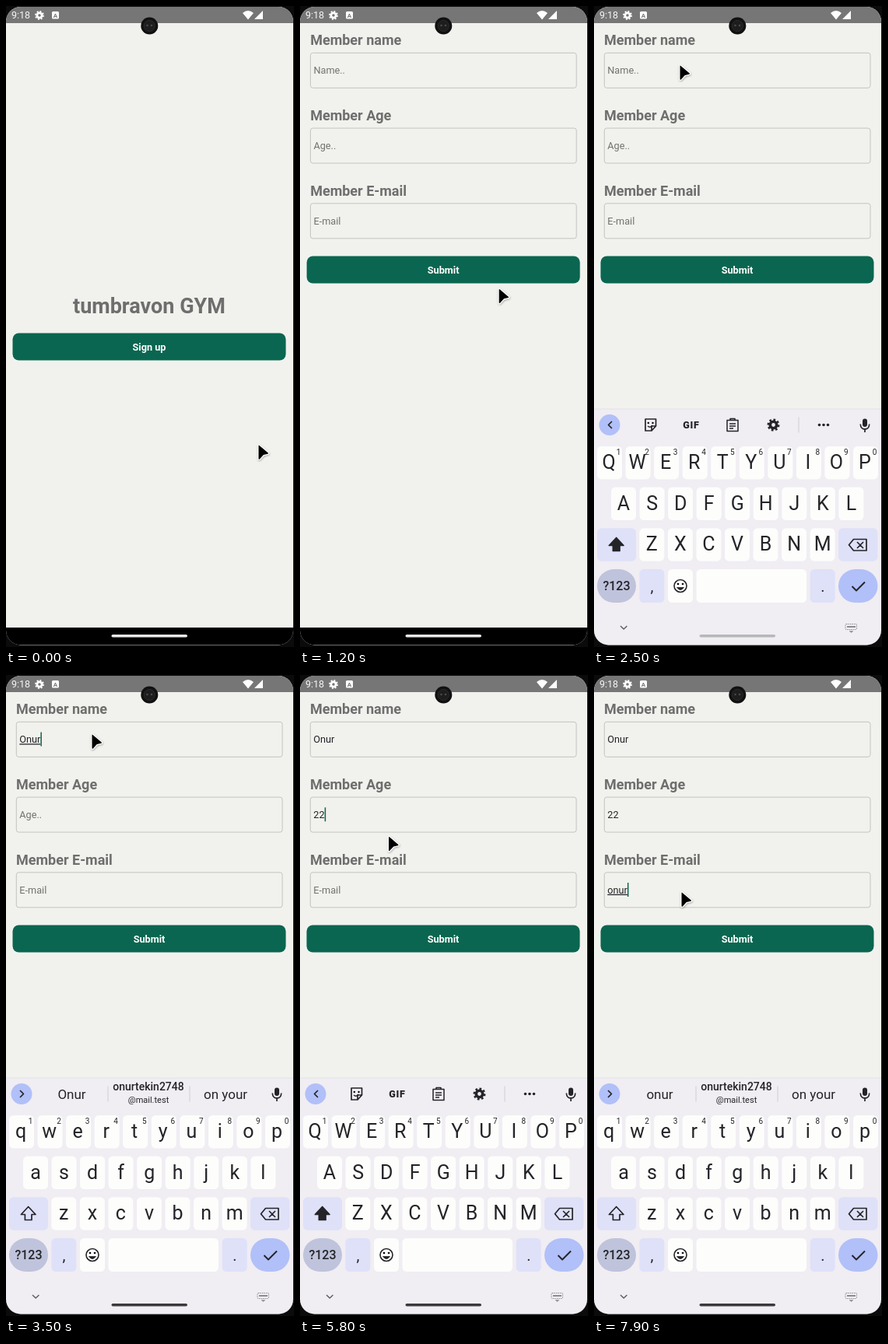
These frames come from a looping animation (370x824 px, 8 s). An HTML page:

```html
<!DOCTYPE html>
<html lang="en">
<head>
<meta charset="utf-8">
<title>Member sign up</title>
<style>
html, body { margin: 0; width: 100%; height: 100%; overflow: hidden; background: #0b0b0b; }
svg { display: block; font-family: Roboto, sans-serif; }
text { white-space: pre; }
</style>
</head>
<body>
<svg id="stage" width="370" height="824" viewBox="0 0 370 824"></svg>
<script>
const GREEN = '#0a6650', PAGE = '#f1f2ed', GREY = '#6e6e6e', INK = '#242428';
const KEY = '#fdfdfc', SOFT = '#dfe1f9', BLUE = '#b1c0f8';
const MAIL = ['onurtekin2748', '@mail.test'];

const rect = (x, y, w, h, r, fill, more = '') =>
  `<rect x="${x}" y="${y}" width="${w}" height="${h}" rx="${r}" fill="${fill}" ${more}/>`;
const text = (x, y, size, str, fill = INK, more = '') =>
  `<text x="${x}" y="${y}" font-size="${size}" fill="${fill}" ${more}>${str}</text>`;
const mid = (x, y, size, str, fill, weight = 400, more = '') =>
  text(x, y, size, str, fill, `text-anchor="middle" font-weight="${weight}" ${more}`);
const line = (d, color = INK, w = 1.7, fill = 'none') =>
  `<path d="${d}" fill="${fill}" stroke="${color}" stroke-width="${w}" stroke-linejoin="round"/>`;
const group = (id, body, more = '') => `<g id="${id}" ${more}>${body}</g>`;
const gear = (x, y, s, color) => `<g transform="translate(${x} ${y}) scale(${s})" fill="none" stroke="${color}">
  <circle r="4.6" stroke-width="4"/>
  <circle r="7.4" stroke-width="2.6" pathLength="16" stroke-dasharray="1 1"/></g>`;

const button = (y, label) => rect(8.5, y, 351, 35, 8, GREEN) + mid(184, y + 22.5, 12.7, label, '#fff', 700);

const status = rect(0, 1, 369, 21, 0, '#767676') + text(7, 16, 12.5, '9:18', '#f7f7f7') +
  gear(43, 12, .68, '#fff') + rect(59, 7, 9, 9.5, 1.5, '#fff') + mid(63.5, 14.6, 8, 'A', '#767676', 700) +
  '<path d="M304 9Q311 3 318 9L311 17.5ZM319 17L330 6V17Z" fill="#fff"/>';

const camera = `<circle cx="184.3" cy="25.5" r="11" fill="#111"/>
  <circle cx="184.3" cy="25.5" r="7" fill="#1d1d1d" stroke="#2c2c2c"/>
  <circle cx="181.5" cy="25" r="1.3" fill="#4a4a4a"/><circle cx="187" cy="25" r="1.3" fill="#4a4a4a"/>`;

const fields = [['name', 'Name..'], ['Age', 'Age..'], ['E-mail', 'E-mail']];
const form = rect(0, 22, 369, 777, 0, PAGE) + fields.map(([label], i) => {
  const y = i * 96.75;
  return text(13, 50 + y, 18, 'Member ' + label, GREY, 'font-weight="700"') +
    rect(13.3, 60.3 + y, 341.7, 45, 3, 'none', 'stroke="#c3c4bf"') +
    text(17.3, 87.3 + y, 12.7, '', INK, `id="field${i}"`);
}).join('') + button(321.5, 'Submit') + rect(17.4, 0, 1.5, 18, 0, GREEN, 'id="caret"');

const home = rect(0, 22, 369, 777, 0, PAGE) + mid(184, 395, 27, 'tumbravon GYM', GREY, 700) +
  group('press', button(420.5, 'Sign up'));

// Keyboard
const PITCH = 36.55;
const rows = [['qwertyuiop', 20, 566], ['asdfghjkl', 38, 618.6], ['zxcvbnm', 74.3, 671.3]];
const eachKey = fn => rows.map(([keys, x, y]) =>
  [...keys].map((k, i) => fn(k, x + i * PITCH, y, i)).join('')).join('');
const keyBoxes = eachKey((k, x, y) => rect(x - 16, y, 32, 42.4, 5.5, KEY));
const letters = change => eachKey((k, x, y) => mid(x - (y < 600 ? 1 : 0), y + 29, 25, change(k)));
const digits = [...'1234567890'].map((d, i) => mid(31.5 + i * PITCH, 577, 10, d)).join('');
const shift = fill => line('M28.7 683.5L38 693.5H33V700.5H24.4V693.5H19.4Z', INK, 1.7, fill);
const divider = x => rect(x - .5, 528.5, 1, 20, 0, '#cfcdd4');

const controls = rect(4, 671.3, 50, 42.4, 5.5, SOFT) + rect(314, 671.3, 50.5, 42.4, 5.5, SOFT) +
  line('M327.5 692.7L333.5 685.5H350V700H333.5ZM338 689L346 697M346 689L338 697') +
  rect(4, 724, 50, 43, 21.5, '#bfc3dc') + mid(29, 751, 16, '?123', INK, 500) +
  rect(58.3, 724, 32, 43, 5.5, SOFT) + mid(74.5, 753, 20, ',') +
  rect(95, 724, 32, 43, 5.5, KEY) + rect(131.5, 724, 141.5, 43, 5.5, KEY) +
  rect(277.7, 724, 32, 43, 5.5, SOFT) + mid(294, 753, 20, '.') +
  rect(314, 724, 50.5, 43, 21.5, BLUE) + line('M331.5 746L337 751.5L348 740.5', INK, 2) +
  `<circle cx="111" cy="745.5" r="8" fill="none" stroke="${INK}" stroke-width="1.6"/>
   <circle cx="108" cy="743" r="1.3"/><circle cx="114" cy="743" r="1.3"/>` +
  line('M106.5 747.5Q111 753.5 115.5 747.5Z', INK, .8, INK) +
  line('M34 797L38.2 801L42.4 797', '#5c5b60', 1.4) +
  rect(323, 794.5, 14.5, 7, 1, 'none', 'stroke="#8d8b91" stroke-dasharray="1.5 1"') +
  line('M325 798H336', '#8d8b91', 2.2) + line('M328 803.5H333L330.5 805.5Z', '#8d8b91', .5, '#8d8b91');

const mic = rect(345, 530.5, 6, 10.5, 3, INK) + line('M342.3 537.5C342.3 546 353.7 546 353.7 537.5M348 544V548');
const tools = line('M23 534L18.5 538.5L23 543') +
  line('M66 531H79.5V540L74 546H66ZM79 540H74V546') + line('M69 540Q72 543 75 539', INK, 1.4) +
  '<circle cx="69.8" cy="536" r="1.2"/><circle cx="75.5" cy="536" r="1.2"/>' +
  mid(125, 543, 12.5, 'GIF', INK, 900, 'letter-spacing=".8"') +
  line('M171 532.5H185V546.5H171ZM175 532V530.5H181V532M174 537H182M174 540H182M174 543H179', INK, 1.5) +
  gear(230.5, 538.5, .92, INK) + divider(263) +
  [289.5, 295, 300.5].map(x => `<circle cx="${x}" cy="538.5" r="1.8" fill="${INK}"/>`).join('');
const hints = line('M18 534L22.5 538.5L18 543') + mid(84.5, 545, 17, '', INK, 400, 'id="hint"') +
  divider(131) + mid(183, 533.8, 14, MAIL[0], INK, 500) + mid(183, 550, 11, MAIL[1]) +
  divider(236) + mid(282, 545, 17, 'on your');

const keyboard = rect(0, 518, 369, 304, 0, '#f0edf3') + rect(0, 517.5, 369, 1, 0, '#e6e4e8') +
  `<circle cx="20" cy="538.5" r="13.5" fill="${BLUE}"/>` + mic +
  group('tools', tools) + group('hints', hints) + keyBoxes + digits + controls +
  group('upper', letters(k => k.toUpperCase()) + shift(INK)) + group('lower', letters(k => k) + shift('none'));

const stage = document.getElementById('stage');
stage.innerHTML = `<clipPath id="screen">${rect(0, 1, 369, 820.5, 19, '#000')}</clipPath>
  <filter id="shade" x="-50%" y="-50%" width="200%" height="200%">
    <feDropShadow dx=".5" dy="1" stdDeviation="1.2" flood-opacity=".35"/></filter>
  <g clip-path="url(#screen)">` + rect(0, 1, 369, 821, 0, '#fff') +
  group('home', home) + group('form', form) + rect(0, 799, 369, 23, 0, '#000') + status +
  group('keyboard', keyboard) + rect(135.5, 808, 97.5, 3.6, 1.8, '#eee', 'id="handle"') + `</g>` + camera +
  group('mouse', '<path d="M.5 1.2Q.5 .2 1.5 .9L12.8 10.6Q13.4 11.4 12.4 11.7L6.8 13L1.8 18.4Q.5 19.4 .5 18Z" stroke="#fff" stroke-width="2.4" paint-order="stroke" filter="url(#shade)"/>');

const el = id => document.getElementById(id);
const set = (id, name, value) => el(id).setAttribute(name, value);
const show = (id, on) => set(id, 'visibility', on ? 'visible' : 'hidden');
const part = (t, a, b) => Math.min(1, Math.max(0, (t - a) / (b - a)));
const smooth = p => p * p * (3 - 2 * p);

const mousePath = [[0, 324, 564], [780, 298, 448], [1000, 298, 448], [1650, 110, 76],
  [4300, 110, 76], [4650, 114, 182], [5650, 114, 182], [6100, 112, 279], [8000, 112, 279]];
const typing = [
  { word: 'Onur', focus: 1880, keys: [2800, 2900, 3000, 3400], commit: 3700 },
  { word: '22', focus: 4680, keys: [5200, 5500], commit: 5500 },
  { word: 'onur', focus: 6190, keys: [7000, 7200, 7400, 7700], commit: 9000 }
];

// Fast start, very slow finish
const pageEase = p => p < 1 / 6 ? .4 * (6 * p) ** 2.8 : 1 - .6 * ((1 - p) * 1.2) ** 7;

function moveMouse(t) {
  const i = mousePath.findIndex(k => k[0] > t);
  const [t0, x0, y0] = mousePath[i - 1], [t1, x1, y1] = mousePath[i];
  const p = smooth(part(t, t0, t1));
  set('mouse', 'transform', `translate(${x0 + (x1 - x0) * p} ${y0 + (y1 - y0) * p})`);
}

function drawFields(t) {
  let active = -1;
  typing.forEach(({ word, focus, keys, commit }, i) => {
    const typed = word.slice(0, keys.filter(k => k <= t).length), node = el('field' + i);
    node.textContent = typed || fields[i][1];
    node.setAttribute('fill', typed ? INK : '#72736f');
    node.setAttribute('text-decoration', typed && t < commit ? 'underline' : 'none');
    if (t >= focus) active = i;
    if (typed && i !== 1) el('hint').textContent = typed;
  });
  if (active < 0) return show('caret', false);
  const { focus, keys, commit } = typing[active];
  const last = Math.max(...[focus, ...keys, commit].filter(k => k <= t));
  const width = t >= keys[0] ? el('field' + active).getComputedTextLength() : 0;
  set('caret', 'x', 17.4 + width);
  set('caret', 'y', 73.5 + active * 96.75);
  show('caret', (t - last) % 1000 < 500);
}

function draw(t) {
  const age = t - 935, p = pageEase(part(age, 0, 450));
  set('press', 'opacity', 1 - .6 * part(t, 780, 900));
  set('home', 'transform', `translate(${-37 * p} 0)`);
  set('home', 'opacity', 1 - part(age, 0, 88));
  set('form', 'transform', `translate(${37 * (1 - p)} 0)`);
  set('form', 'opacity', part(age, 50, 133));

  drawFields(t);
  moveMouse(t);

  const rise = 1 - (1 - part(t, 1960, 2360)) ** 3;
  set('keyboard', 'transform', `translate(0 ${304 * (1 - rise)})`);
  const words = t >= 2800 && t < 4500 || t >= 7000;
  const lower = words || t >= 5000 && t < 5700;
  show('hints', words);
  show('tools', !words);
  show('lower', lower);
  show('upper', !lower);
  const tone = 236 - 51 * part(t, 2050, 2350) - 127 * part(t, 2500, 2750);
  set('handle', 'fill', `rgb(${tone},${tone},${tone})`);
}

function frame() {
  draw(performance.now() % 8000);
  requestAnimationFrame(frame);
}
frame();
</script>
</body>
</html>
```
